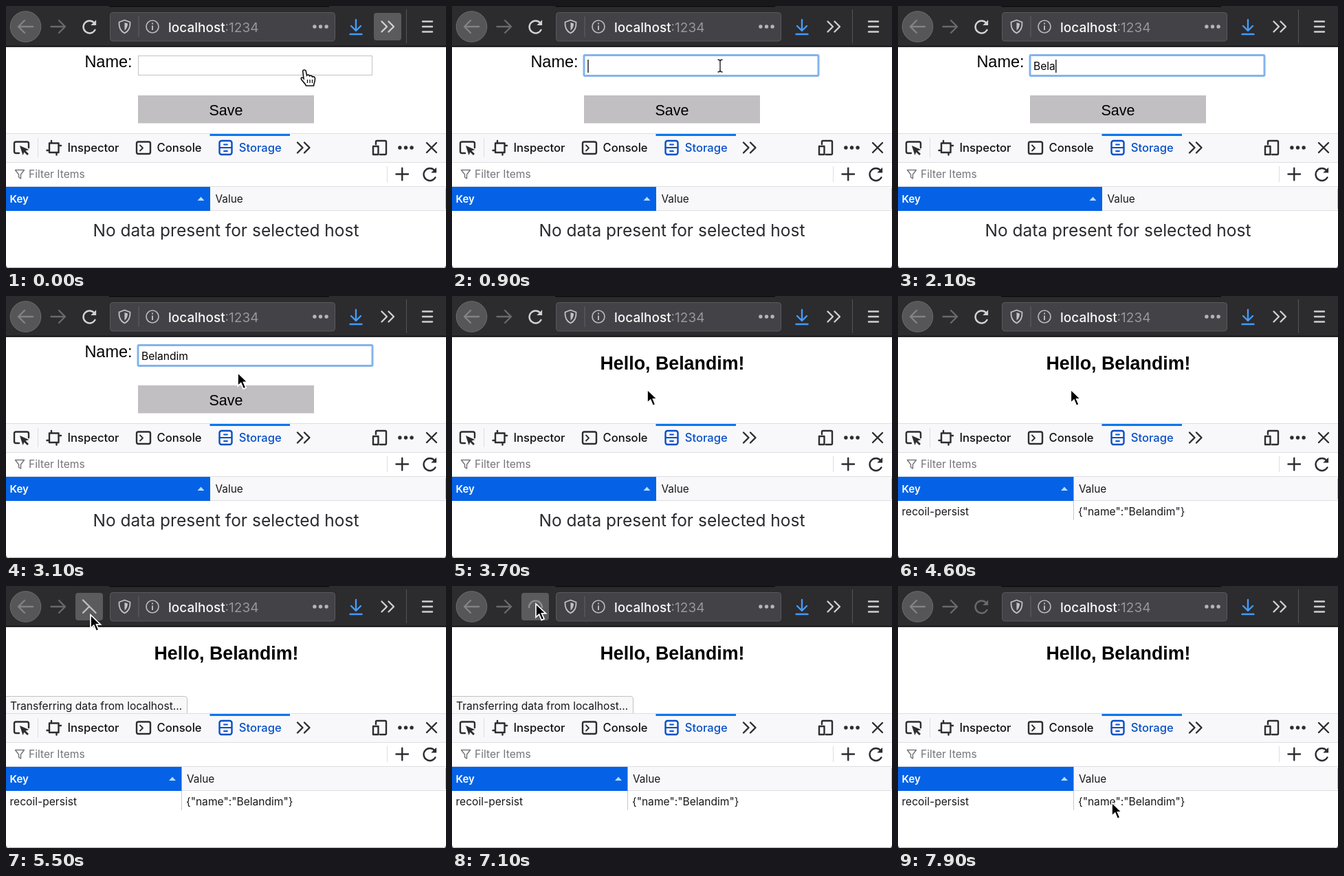
These frames come from a looping animation (640x381 px, 8 s). An HTML page:

```html
<!DOCTYPE html>
<html lang="en">
<head>
<meta charset="utf-8">
<title>Persisted form state</title>
<style>
  html, body { margin: 0; width: 100%; height: 100%; overflow: hidden; background: #fff; }
  svg { display: block; width: 100vw; height: 100vh; }
  text { font: 15.6px Inter, Roboto, sans-serif; fill: #18181b; white-space: pre; }
  .page { font-family: "Liberation Sans", Arial, sans-serif; fill: #000; }
  .tab { font-size: 16.6px; font-weight: 500; fill: #111113; }
  .line { fill: none; stroke: currentColor; stroke-width: 2.4; stroke-linecap: round; stroke-linejoin: round; }
  .thin { stroke-width: 1.8; }
  .rule { stroke: #dedee1; }
</style>
</head>
<body>
<svg viewBox="0 0 640 381">
  <defs>
    <g id="reload">
      <path class="line" d="M8 4.2A9 9 0 1 1 6.8-6"/>
      <path fill="currentColor" d="M9.6-10.2V-2.4H1.8Z"/>
    </g>
    <path id="chevrons" class="line" d="M0-7.5 7.5 0 0 7.5M10-7.5 17.5 0 10 7.5"/>
    <g id="dots" fill="currentColor"><circle r="2.7"/><circle cx="-8.6" r="2.7"/><circle cx="8.6" r="2.7"/></g>
  </defs>

  <!-- Page -->
  <rect width="640" height="381" fill="#fff"/>
  <g id="form">
    <text class="page" x="114.4" y="89" style="font-size:23.5px">Name:</text>
    <rect x="192.5" y="72.5" width="340" height="28" fill="#fff" stroke="#c3c3c5"/>
    <g id="focus">
      <rect x="192" y="71.5" width="341" height="30" rx="1.5" fill="#fff" stroke="#82b4ed" stroke-width="3"/>
      <text id="typed" x="197" y="92.5" style="fill:#000"></text>
      <path id="caret" d="M0 78V97" stroke="#000" stroke-width="1.3"/>
    </g>
    <rect id="save" x="192" y="130" width="256" height="40.5" fill="#c1bfc1"/>
    <text class="page" x="320" y="159" text-anchor="middle" style="font-size:21.5px">Save</text>
  </g>
  <text id="hello" class="page" x="320.5" y="106.5" text-anchor="middle" style="font-size:26.8px;font-weight:bold"></text>
  <g id="status">
    <path d="M-1 160.5H260a3.5 3.5 0 0 1 3.5 3.5V187H-1Z" fill="#f8f8f9" stroke="#c2c2c5"/>
    <text x="6" y="180">Transferring data from localhost...</text>
  </g>

  <!-- Browser toolbar -->
  <rect width="640" height="59.5" fill="#2c2b2e"/>
  <path d="M0 58.7H640M150 .5H470" stroke="#09090b" stroke-width="1.6"/>
  <circle cx="28.5" cy="30" r="22.3" fill="#565558" stroke="#6d6c70"/>
  <path class="line" color="#838285" d="M39 30H18.5M27 21 18 30 27 39"/>
  <path class="line" color="#69686c" d="M65.5 30H86M77 21 86 30 77 39"/>
  <rect id="reloadHover" x="101" y="10" width="40" height="40" rx="4" fill="#5b5a5d"/>
  <use id="reloadIcon" href="#reload" x="121.5" y="30.5"/>
  <path id="loadIcon" class="line"/>
  <rect x="151.5" y="9.5" width="327" height="41.5" rx="4" fill="#434246" stroke="#5a595d"/>
  <path class="line thin" color="#c3c2c5" d="M172.5 20.5 180.5 23.5C181 31 178.5 36.5 172.5 39.5 166.5 36.5 164 31 164.5 23.5Z"/>
  <path d="M172.5 24 177 25.5C177 30 175.5 33 172.5 35.5Z" fill="#c3c2c5"/>
  <path d="M193 15V45" stroke="#626165"/>
  <circle cx="213" cy="30" r="9" fill="none" stroke="#b9b8bb" stroke-width="1.7"/>
  <path d="M213 28.5V35M213 24.5V26.5" stroke="#b9b8bb" stroke-width="2"/>
  <text x="236" y="37.5" style="font-size:19px;font-weight:500;fill:#f9f9fa">localhost<tspan fill="#98979b" font-weight="400">:1234</tspan></text>
  <use href="#dots" x="457.5" y="30" color="#b5b4b7"/>
  <path class="line" color="#459bf8" d="M509 20V35M502 29 509 36 516 29M500.5 41H517.5"/>
  <rect id="moreHover" x="535" y="10" width="40" height="40" rx="4" fill="#5b5a5d"/>
  <use href="#chevrons" x="546.5" y="30" color="#cfced1"/>
  <path d="M582.5 5V54" stroke="#56555a"/>
  <path class="line" color="#cfced1" d="M606 22.5H620M606 30H620M606 37.5H620"/>

  <!-- Developer tools -->
  <path d="M0 186H640V227.5H0ZM0 262.5H640V297.5H0Z" fill="#f8f8fa"/>
  <path class="rule" d="M0 185.5H640M0 227.5H640M0 262.5H640M0 297.5H640M46.5 192V220M554.5 233V256"/>
  <g color="#2d2d31">
    <path class="line" d="M19 214H14.5A2.5 2.5 0 0 1 12 211.5V200A2.5 2.5 0 0 1 14.5 197.5H30.5A2.5 2.5 0 0 1 33 200V206"/>
    <path fill="currentColor" d="M20 203 33.5 209 28.5 210.5 33 215 31 217 26.5 212.5 24.5 217Z"/>
    <path class="line" d="M63 199.5H76.5V213H63ZM66 199V196M73.5 213.5V216.5M62.5 210H59.5M77 203H80"/>
    <rect class="line" x="190" y="197.5" width="20" height="17.5" rx="2.5"/>
    <path class="line thin" d="M195 202.5 199 206.5 195 210.5"/>
    <use href="#chevrons" x="424" y="206"/>
    <path class="line" d="M538 201V197.5A1.5 1.5 0 0 1 539.5 196H551.5A1.5 1.5 0 0 1 553 197.5V214.5A1.5 1.5 0 0 1 551.5 216H544M534 204H541.5V216H534Z"/>
    <use href="#dots" x="581.5" y="206"/>
    <path class="line" d="M612 199 626 213M626 199 612 213M567.5 244.5H585M576.25 235.75V253.25"/>
    <use href="#reload" x="616.5" y="245"/>
  </g>
  <path d="M296.5 187.5H413" stroke="#0b76ea" stroke-width="3"/>
  <g color="#0850c8">
    <rect class="line" x="310.5" y="196" width="18" height="20" rx="3"/>
    <path class="line thin" d="M311 206H328M317 201.5H322M317 211H322"/>
  </g>
  <text class="tab" x="89.5" y="212">Inspector</text>
  <text class="tab" x="219.5" y="212">Console</text>
  <text class="tab" x="338.8" y="212" style="fill:#0850c8">Storage</text>
  <path class="line" color="#77777b" style="stroke-width:1.5" d="M13.5 238.5H26.5L21.5 245V251L18.5 249V245Z"/>
  <text x="33" y="250" style="fill:#75757a">Filter Items</text>

  <!-- Storage table -->
  <rect id="keyHead" y="263" height="35" fill="#0562e6"/>
  <text x="5.5" y="286" style="fill:#fff;font-weight:600;font-size:15px">Key</text>
  <path id="sort" d="M-5 3H5L0-2.5Z" fill="#b9dcff"/>
  <text id="valueHead" y="286" style="font-size:15.4px">Value</text>
  <path d="M639.5 265V295" stroke="#bfbfc3"/>
  <text id="empty" x="320" y="334.5" text-anchor="middle" style="font-size:24.5px;fill:#2a2a2f">No data present for selected host</text>
  <g id="row">
    <rect id="flash" y="298" width="640" height="28.5" fill="#fdf7c0"/>
    <path d="M255.5 298V326" stroke="#c9c9cc"/>
    <text x="5.5" y="318.5">recoil-persist</text>
    <text id="value" x="262" y="318.5"></text>
  </g>
  <path d="M0 376V381H5Q0 381 0 376ZM640 376V381H635Q640 381 640 376Z" fill="#555"/>
  <path d="M4 380.5H636" stroke="#b5b5b8"/>

  <!-- Pointers -->
  <path id="arrow" d="M0 0V19.5L4.7 15.2 8.2 23.5 12 21.8 8.5 13.8H14.5Z" fill="#000" stroke="#fff" stroke-width="1.7"/>
  <g id="hand">
    <path d="M-2.3 2C-2.3-.7 2-.7 2.3 2L3.5 8C4.5 6.5 7 6.8 7.5 8.8 9 7.5 11 8 11.5 10 13.5 9 15.5 10 15.5 12.5 15.8 16.5 14 18.5 13.5 23H2.5C1.5 19.5-2.5 17-4.5 13.5-5.5 11-3 10-1 12.5Z" fill="#fff" stroke="#111" stroke-width="1.6"/>
    <path d="M4.5 14V19M8 14V19M11.5 14V19" stroke="#111" stroke-width="1.3"/>
  </g>
  <path id="beam" d="M-3.5-9Q0-9 0-6.5 0-9 3.5-9M0-6.5V6.5M-3.5 9Q0 9 0 6.5 0 9 3.5 9" fill="none" stroke="#222" stroke-width="1.4"/>
</svg>
<script>
const LOOP = 8000, STEP = 100, NAME = "Belandim";
const FOCUS = 600, TYPE = 1500, KEY = 185, SHOW = 3500, STORE = 4000;
const clicks = [5400, 6900];
const pointerPath = [
  [0, 434, 93], [300, 390, 87], [2900, 390, 87], [3300, 284, 136], [3800, 284, 136],
  [4200, 262, 136], [4700, 250, 136], [5300, 123, 42], [6200, 123, 42],
  [6700, 122, 26], [7300, 122, 26], [7800, 311, 315], [8000, 311, 315]
];

const el = {};
document.querySelectorAll("[id]").forEach(n => el[n.id] = n);
const show = (name, on) => el[name].style.display = on ? "" : "none";
const place = (name, x, y) => el[name].setAttribute("transform", `translate(${x} ${y})`);
const within = (t, from, to) => t >= from && t < to;

el.hello.textContent = `Hello, ${NAME}!`;
el.value.textContent = `{"name":"${NAME}"}`;

function pointerAt(t) {
  const i = pointerPath.findIndex(p => p[0] > t);
  const [t0, x0, y0] = pointerPath[i - 1], [t1, x1, y1] = pointerPath[i];
  const u = (t - t0) / (t1 - t0), k = u * u * (3 - 2 * u);
  return [x0 + (x1 - x0) * k, y0 + (y1 - y0) * k];
}

function drawPointer(t) {
  const [x, y] = pointerAt(t);
  const kind = t < 100 ? "hand" : t < TYPE ? "beam" : t < 2900 ? "" : "arrow";
  for (const name of ["hand", "beam", "arrow"]) {
    show(name, name === kind);
    place(name, x, y);
  }
  show("reloadHover", kind === "arrow" && x > 101 && x < 141 && y > 10 && y < 50);
  show("moreHover", t < 100);
}

function drawForm(t) {
  const count = Math.max(0, Math.min(NAME.length, Math.floor((t - TYPE) / KEY) + 1));
  show("form", t < SHOW);
  show("hello", t >= SHOW);
  show("focus", within(t, FOCUS, 3400));
  el.typed.textContent = NAME.slice(0, count);
  const typing = within(t, TYPE, TYPE + KEY * NAME.length);
  show("caret", typing || (t - FOCUS) % 1000 < 500);
  if (t < SHOW) place("caret", 198 + (count ? el.typed.getComputedTextLength() : 0), 0);
  el.save.setAttribute("fill", within(t, 3400, SHOW) ? "#aaa8aa" : "#c1bfc1");
}

function drawTable(t) {
  const filled = t >= STORE, width = filled ? 255.5 : 297;
  show("row", filled);
  show("empty", !filled);
  el.keyHead.setAttribute("width", width);
  el.valueHead.setAttribute("x", width + 7.5);
  place("sort", width - 13.5, 280);
  el.flash.setAttribute("opacity", Math.max(0, 1 - Math.max(0, (t - STORE) / 500) ** 3));
}

function drawReload(t) {
  const age = t - (clicks.filter(c => c <= t).pop() ?? -LOOP);
  const cross = age < 150, arc = within(age, 150, 300);
  show("loadIcon", cross || arc);
  show("reloadIcon", !cross && !arc);
  show("status", age < 500);
  el.reloadIcon.setAttribute("color", age < 1050 ? "#69686c" : "#d2d1d4");
  el.loadIcon.setAttribute("d", cross
    ? "M112 20.5 130.5 39M112 39 121 30"
    : "M112 31A9.5 9.5 0 0 1 131 31");
  el.loadIcon.setAttribute("color", cross ? "#bdbcbf" : "#8d8c90");
}

function frame(now) {
  const t = Math.floor(now % LOOP / STEP) * STEP;
  drawForm(t);
  drawTable(t);
  drawReload(t);
  drawPointer(t);
  requestAnimationFrame(frame);
}
frame(0);
</script>
</body>
</html>
```
